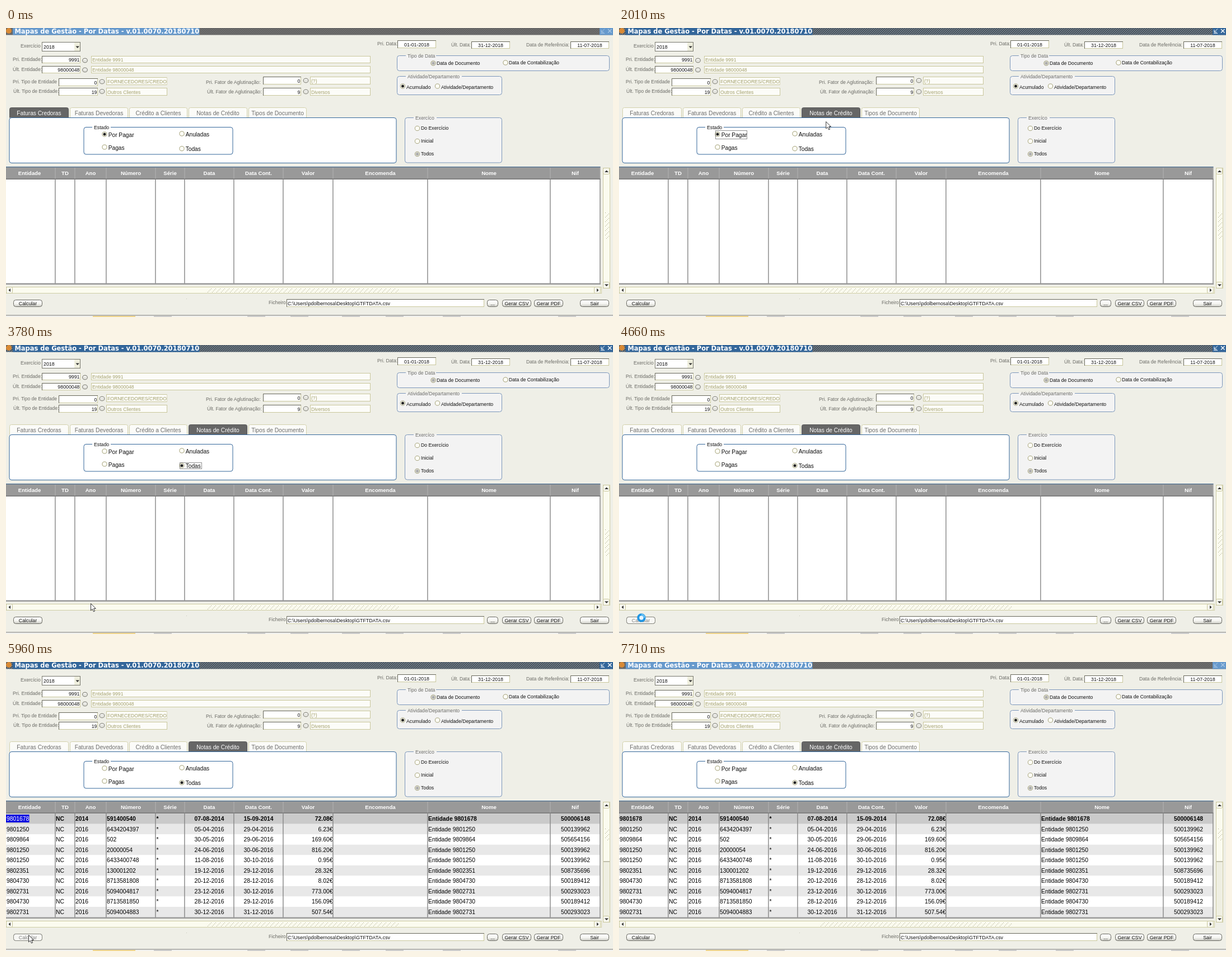
Animation of 1084 by 517 pixels, one loop 7.77 s. Source, as an HTML page:

```html
<!DOCTYPE html>
<html lang="pt">
<head>
<meta charset="utf-8">
<style>
html, body { margin: 0; width: 100%; height: 100%; overflow: hidden; background: #efefe7; }
svg { display: block; width: 100%; height: 100%; font-family: "Liberation Sans", Arial, sans-serif; }
text { white-space: pre; }
</style>
</head>
<body>
<svg id="stage" viewBox="0 0 1084 517"></svg>
<script>
const LOOP = 7770;
const BLUE = '#33669a', LABEL = '#6b6b66', FADED = '#a3a06c', INK = '#111', PANEL = '#f3f3f3';

// drawing helpers; text is placed by its vertical centre
const text = (x, y, s, o = {}) => {
  const { size = 8.7, fill = LABEL, anchor = 'start', bold = false, font = '' } = o;
  return `<text x="${x}" y="${y + size * 0.36}" font-size="${size}" fill="${fill}" text-anchor="${anchor}"` +
    `${bold ? ' font-weight="700"' : ''}${font ? ` font-family="${font}"` : ''}>${s}</text>`;
};
const rect = (x, y, w, h, fill, extra = '') =>
  `<rect x="${x}" y="${y}" width="${w}" height="${h}" fill="${fill}" ${extra}/>`;
const box = (x, y, x2, y2, fill, stroke, r = 0) =>
  rect(x + 0.5, y + 0.5, x2 - x - 1, y2 - y - 1, fill, `stroke="${stroke}" rx="${r}"`);
const path = (d, stroke, fill = 'none', w = 1) =>
  `<path d="${d}" stroke="${stroke}" fill="${fill}" stroke-width="${w}"/>`;
const circle = (x, y, r, fill, stroke = 'none', extra = '') =>
  `<circle cx="${x}" cy="${y}" r="${r}" fill="${fill}" stroke="${stroke}" ${extra}/>`;
const group = (id, s) => `<g id="${id}">${s}</g>`;

function field(x, y, x2, y2, s, align = 'end') {
  const tx = align === 'end' ? x2 - 1.5 : align === 'middle' ? (x + x2) / 2 : x + 2;
  return box(x, y, x2, y2, '#fff', '#c9c79c') +
    path(`M${x + 0.5} ${y2}V${y + 0.5}H${x2}`, '#66665a') +
    text(tx, (y + y2) / 2 + 0.7, s, { size: 8.8, fill: INK, anchor: align });
}
const faded = (x, y, x2, y2, s) =>
  box(x, y, x2, y2, '#fcfcf8', '#c9c79c') + text(x + 2, (y + y2) / 2 + 0.7, s, { size: 8.6, fill: FADED });
const picker = (x, y) =>
  `<ellipse cx="${x}" cy="${y}" rx="4.3" ry="3.8" fill="#e4e4de" stroke="#77776e"/>` +
  path(`M${x - 3} ${y - 1}Q${x} ${y - 3.5} ${x + 3} ${y - 1}`, '#fff');
const radio = (x, y, fill = '#fffff6') => circle(x, y, 4.1, fill, '#98956a', 'stroke-width=".9"');
const dot = (x, y, fill = '#222') => circle(x, y, 2.5, fill);
function frame(x, y, x2, y2, title, tx, tw, o = {}) {
  const { stroke = '#7b96ba', bg = PANEL, fill = LABEL } = o;
  return box(x, y, x2, y2, bg, stroke, 4) + rect(tx - 3, y - 1, tw + 6, 3, bg) + text(tx, y + 0.5, title, { fill });
}
const button = (x, x2, s) =>
  box(x, 486, x2, 499, 'url(#shine)', '#66665f', 4) +
  text((x + x2) / 2, 492.7, s, { size: 8.8, fill: INK, anchor: 'middle' });

const defs = `<defs>
  <linearGradient id="shine" x2="0" y2="1"><stop stop-color="#fff"/><stop offset=".55" stop-color="#f6f6f2"/><stop offset="1" stop-color="#c9c9c2"/></linearGradient>
  <pattern id="dim" width="4" height="4" patternUnits="userSpaceOnUse">${rect(0, 0, 4, 4, '#676767')}${rect(0, 0, 1, 1, '#757575')}${rect(2, 2, 1, 1, '#757575')}</pattern>
  <pattern id="lit" width="4" height="4" patternUnits="userSpaceOnUse">${rect(0, 0, 4, 4, '#56626d')}${rect(0, 0, 1, 1, '#a3abb2')}${rect(1, 1, 1, 1, '#2c3640')}${rect(2, 2, 1, 1, '#a3abb2')}${rect(3, 3, 1, 1, '#2c3640')}</pattern>
  <pattern id="grip" width="8" height="8" x="360" y="466" patternUnits="userSpaceOnUse">${rect(0, 6, 1, 1, '#a5a384')}${rect(2, 4, 1, 1, '#a5a384')}${rect(4, 2, 1, 1, '#a5a384')}${rect(6, 0, 1, 1, '#a5a384')}</pattern>
</defs>`;

function titleBar(id, bar, back, icon) {
  return group(id, rect(0, 0, 1084, 12.5, `url(#${bar})`) + rect(12, 0, 333.5, 12.5, back) +
    circle(5, 5, 5, '#d98a35') +
    text(15.5, 5.7, 'Mapas de Gestão - Por Datas - v.01.0070.20180710',
      { size: 11.43, fill: '#fff', bold: true, font: 'DejaVu Sans, sans-serif' }) +
    rect(1060, 0, 24, 12.5, back) +
    path('M1069 1.5L1063.5 7M1063 3V7.5H1067.5M1062 9.5H1069', icon) +
    path('M1075 2L1081.5 8.5M1081.5 2L1075 8.5', icon, 'none', 1.4));
}

function filters() {
  const lab = (x, y, s) => text(x, y, s);
  const opt = (x, y, s) => text(x, y, s, { fill: INK });
  return lab(26, 32, 'Exercício') + box(64, 25, 133, 42, '#fff', '#77776c') +
    text(67, 34, '2018', { size: 8.9, fill: INK }) + rect(122, 26, 10, 15, '#eeeedd') +
    path('M124.5 32.5H131L127.7 36Z', 'none', '#333') +
    lab(12, 56, 'Pri. Entidade:') + field(64, 50, 133, 63, '9991') + picker(141, 58) + faded(152, 50, 651, 63, 'Entidade 9991') +
    lab(12, 74, 'Últ. Entidade:') + field(64, 68, 133, 81, '98000048') + picker(141, 75) + faded(152, 68, 651, 81, 'Entidade 98000048') +
    text(12, 96, 'Pri. Tipo de Entidade', { size: 8.5 }) + field(94, 90, 164, 104, '0') + picker(171.5, 96) +
    faded(179, 88, 288, 102, 'FORNECEDORES/CREDORE') + rect(287.5, 87, 14, 16, '#efefe7') +
    text(13, 113, 'Últ. Tipo de Entidade:', { size: 8.5 }) + field(94, 107, 164, 121, '19') + picker(171.5, 113.5) +
    faded(179, 107, 288, 121, 'Outros Clientes') +
    lab(357, 97, 'Pri. Fator de Aglutinação:') + field(459, 87, 527, 101, '0') + picker(535.5, 94) + faded(543, 87, 651, 101, '(?)') +
    lab(359, 114, 'Últ. Fator de Aglutinação:') + field(459, 107, 527, 121, '9') + picker(535.5, 114) + faded(543, 107, 651, 121, 'Diversos') +
    lab(663, 28, 'Pri. Data:') + field(699, 22, 768, 36, '01-01-2018', 'middle') +
    text(795, 30, 'Últ. Data:', { size: 8.4 }) + field(831, 24, 900, 37, '31-12-2018', 'middle') +
    lab(929, 30, 'Data de Referência:') + field(1008, 24, 1077, 37, '11-07-2018', 'middle') +
    frame(698, 49, 1078, 77, 'Tipo de Data', 717, 48) +
    radio(763, 63, '#e2e2dc') + dot(763, 63, '#aaa') + opt(769, 62.5, 'Data de Documento') +
    radio(892, 62) + opt(898, 62, 'Data de Contabilização') +
    frame(698, 86, 886, 120, 'Atividade/Departamento', 717, 94) +
    radio(708.5, 104) + dot(708.5, 104) + opt(715, 105.5, 'Acumulado') +
    radio(770.5, 104) + opt(777, 105.5, 'Atividade/Departamento') +
    frame(712, 160, 886, 241.5, 'Exercíco', 731, 35) +
    radio(734.5, 179.5) + opt(741, 178.5, 'Do Exercício') +
    radio(734.5, 202.5) + opt(741, 202, 'Inicial') +
    radio(734.5, 225.5, '#e2e2dc') + dot(734.5, 225.5, '#aaa') + opt(741, 225, 'Todos');
}

const TABS = [[6, 112, 'Faturas Credoras'], [114, 218, 'Faturas Devedoras'], [220, 324, 'Crédito a Clientes'],
  [326, 431, 'Notas de Crédito'], [433, 537, 'Tipos de Documento']];
function tabSet(id, selected) {
  return group(id, TABS.map(([x, x2, s], i) => {
    const on = i === selected;
    return path(`M${x + 0.5} 160.5V145.5Q${x + 0.5} 142.5 ${x + 3.5} 142.5H${x2 - 3.5}Q${x2 - 0.5} 142.5 ${x2 - 0.5} 145.5V160.5`,
      on ? '#5a5a5a' : '#d3d1ac', on ? '#666' : '#fbfbf8') +
      text((x + x2) / 2, 152.7, s, { size: 10.2, fill: on ? '#fff' : '#6d6d6d', anchor: 'middle' });
  }).join(''));
}

function statePanel() {
  const opt = (x, y, ty, s) => radio(x, y) + text(x + 6.7, ty, s, { size: 10.2, fill: INK });
  const focus = (id, x, y, w, h) =>
    group(id, rect(x + 0.5, y + 0.5, w, h, 'none', 'stroke="#222" stroke-dasharray="1 1"'));
  return box(5.5, 160, 697.5, 242, '#fff', BLUE, 4) +
    frame(138.5, 177, 405.5, 226.5, 'Estado', 157, 27, { stroke: BLUE, bg: '#fff', fill: INK }) +
    opt(176, 190, 191.5, 'Por Pagar') + opt(314, 189, 190, 'Anuladas') +
    opt(176, 213, 214.5, 'Pagas') + opt(314, 215.7, 216, 'Todas') +
    group('dotPay', dot(176, 190)) + group('dotAll', dot(314, 215.7)) +
    focus('focusPay', 172, 183, 56, 15) + focus('focusAll', 310, 210, 39, 11);
}

const EDGES = [88, 123, 179, 267, 319, 407, 495, 584, 753, 972, 1061];
const HEADS = ['Entidade', 'TD', 'Ano', 'Número', 'Série', 'Data', 'Data Cont.', 'Valor', 'Encomenda', 'Nome', 'Nif'];
const ROWS = `9801678 2014 591400540 07-08-2014 15-09-2014 72.08 500006148
9801250 2016 6434204397 05-04-2016 29-04-2016 6.23 500139962
9809864 2016 502 30-05-2016 29-06-2016 169.60 505654156
9801250 2016 20000054 24-06-2016 30-06-2016 816.20 500139962
9801250 2016 6433400748 11-08-2016 30-10-2016 0.95 500139962
9802351 2016 130001202 19-12-2016 29-12-2016 28.32 508735696
9804730 2016 8713581808 20-12-2016 28-12-2016 8.02 500189412
9802731 2016 5094004817 23-12-2016 30-12-2016 773.00 500293023
9804730 2016 8713581850 28-12-2016 29-12-2016 156.09 500189412
9802731 2016 5094004883 30-12-2016 31-12-2016 507.54 500293023`.split('\n').map(r => r.split(' '));

function rowSet() {
  return ROWS.map(([id, year, num, date, booked, value, nif], i) => {
    const y = 280.5 + i * 18.53;
    const cell = (x, s, anchor) => text(x, y, s, { size: 10.35, fill: '#000', bold: i === 0, anchor });
    return rect(0, y - 9.3, 1061, 18.53, i === 0 ? '#cacaca' : i % 2 ? '#e8e8e8' : '#fff') +
      cell(1, id) + cell(89, 'NC') + cell(124, year) + cell(180, num) + cell(268.5, '*') +
      cell(363, date, 'middle') + cell(451, booked, 'middle') + cell(583.5, value + '€', 'end') +
      cell(754, 'Entidade ' + id) + cell(1017, nif, 'middle');
  }).join('') + group('pick', rect(0, 273, 41.5, 14, '#0a0ae0') + text(1, 280.5, '9801678', { size: 10.35, fill: '#fff' }));
}

function table() {
  return rect(0, 270, 1061, 188, '#fff') + group('rows', rowSet()) +
    rect(0, 248.5, 1061.5, 22, '#999') + rect(0, 248, 1061.5, 1.2, '#4a6d92') + rect(0, 269.5, 1061.5, 1.5, '#777') +
    HEADS.map((s, i) => text(((EDGES[i - 1] || -4) + EDGES[i]) / 2, 259.5, s,
      { size: 9.6, fill: '#fff', bold: true, anchor: 'middle' })).join('') +
    EDGES.map(x => rect(x - 0.8, 270, 1.4, 188, '#858585') + rect(x - 0.5, 250, 1, 19, '#b4b4b4')).join('') +
    rect(0, 456.5, 1062, 2.5, '#999');
}

function scrollBars() {
  const end = (x, y, d) => box(x, y, x + 12, y + 12, '#f7f7ee', '#c9c79c', 2) + path(d, 'none', '#333');
  return box(0, 463, 1064, 475, '#fbfbef', '#cfcda5') +
    end(0, 463, 'M8 466V472L4.5 469Z') + end(1050, 463, 'M1055 466V472L1058.5 469Z') +
    rect(360, 466, 342, 7, 'url(#grip)') +
    box(1066, 250, 1079, 466, '#fbfbef', '#cfcda5') +
    end(1066, 250, 'M1069 258H1076L1072.5 254.5Z') + end(1066, 454, 'M1069 458.5H1076L1072.5 462Z') +
    group('gripFull', rect(1069, 330, 8, 48, 'url(#grip)')) +
    group('gripPart', rect(1067, 357, 11, 97, '#efefe2') + rect(1067, 356.5, 11, 1, '#8c8a72') + rect(1069, 297, 8, 23, 'url(#grip)'));
}

function footer() {
  const tints = [155, 264, 431, 508, 600, 678, 780, 986];
  return button(13, 65, 'Calcular') +
    group('hover', box(13, 486, 65, 499, '#f7f7f4', '#85857d', 4) +
      text(39, 492.7, 'Calcular', { size: 8.8, fill: '#808080', anchor: 'middle' })) +
    text(469, 490.5, 'Ficheiro:') + field(501, 485, 854, 499, 'C:\\Users\\pdolbernosa\\Desktop\\GTFTDATA.csv', 'start') +
    button(859, 879, '...') + button(886, 938, 'Gerar CSV') + button(943, 995, 'Gerar PDF') + button(1025, 1077, 'Sair') +
    rect(322, 484, 1, 1, '#c4c4b8') + rect(0, 513.5, 1084, 1.2, '#777') + rect(0, 514.7, 1084, 2.3, '#f3f3f0') +
    tints.map((x, i) => rect(x, 515, i ? 32 : 76, 2, i ? '#cdcdcd' : '#f0d58c')).join('');
}

const arrow = path('M.5 .5V13L3.4 10.3L5.5 15L7.6 14L5.6 9.5H9.3Z', '#222', '#fff', 0.9);
const ring = circle(0, 0, 5.7, '#e9f6ff', '#2196e3', 'stroke-width="4"') +
  path('M0 -5.7A5.7 5.7 0 0 1 5.7 0', '#6cc3f5', 'none', 2.5);

const stage = document.getElementById('stage');
stage.innerHTML = defs + rect(0, 0, 1084, 517, '#efefe7') +
  titleBar('idle', 'dim', '#6699cc', '#a9c6e4') + titleBar('active', 'lit', '#33669a', '#fff') +
  filters() + tabSet('tabsA', 0) + tabSet('tabsB', 3) + statePanel() + table() + scrollBars() + footer() +
  group('arrow', arrow) + group('busy', ring);

// pointer moves: start, end, steps, way points (evenly spaced over the steps)
const MOVES = [
  [230, 530, 5, [[841, 362], [375, 153]]],
  [2010, 2310, 5, [[375, 153], [346, 223]]],
  [2770, 2770, 1, [[346, 223], [341, 215]]],
  [3040, 3190, 3, [[341, 215], [346, 223]]],
  [3470, 4200, 10, [[346, 223], [151, 462], [40, 488]]],
  [6210, 6980, 11, [[40, 488], [240, 490], [560, 452], [800, 442], [961, 461]]],
  [7080, 7080, 1, [[961, 461], [1012, 492]]]
];
function pointer(t) {
  const [from, to, steps, pts] = MOVES.filter(m => t >= m[0]).pop() || MOVES[0];
  const part = to > from ? Math.min(1, Math.max(0, (t - from) / (to - from))) : 1;
  const step = Math.min(steps, Math.floor(part * (steps - 1) + 0.3) + 1);
  const u = step / steps * (pts.length - 1);
  const i = Math.min(pts.length - 2, Math.floor(u));
  return [0, 1].map(c => pts[i][c] + (pts[i + 1][c] - pts[i][c]) * (u - i));
}

const nodes = {};
stage.querySelectorAll('g[id]').forEach(g => nodes[g.id] = g);
const show = (id, on) => nodes[id].style.display = on ? '' : 'none';

function draw() {
  const t = performance.now() % LOOP;
  const within = (a, b) => t >= a && t < b;
  const [x, y] = pointer(t);
  const waiting = within(1390, 1530) || within(4660, 5810);
  const visible = within(230, 7150);
  const active = within(1470, 7710), filled = t >= 5960, all = t >= 2870;

  show('active', active);
  show('idle', !active);
  show('tabsA', t < 1470);
  show('tabsB', t >= 1470);
  show('dotPay', !all);
  show('dotAll', all);
  show('focusPay', within(1530, 2870));
  show('focusAll', within(2870, 4660));
  show('rows', filled);
  show('pick', t < 7710);
  show('gripFull', !filled);
  show('gripPart', filled);
  show('hover', visible && x > 13 && x < 65 && y > 485 && y < 499);
  show('arrow', visible && !waiting);
  show('busy', visible && waiting);
  nodes.arrow.setAttribute('transform', `translate(${x} ${y})`);
  nodes.busy.setAttribute('transform', `translate(${x} ${y})`);
  requestAnimationFrame(draw);
}
draw();
</script>
</body>
</html>
```
